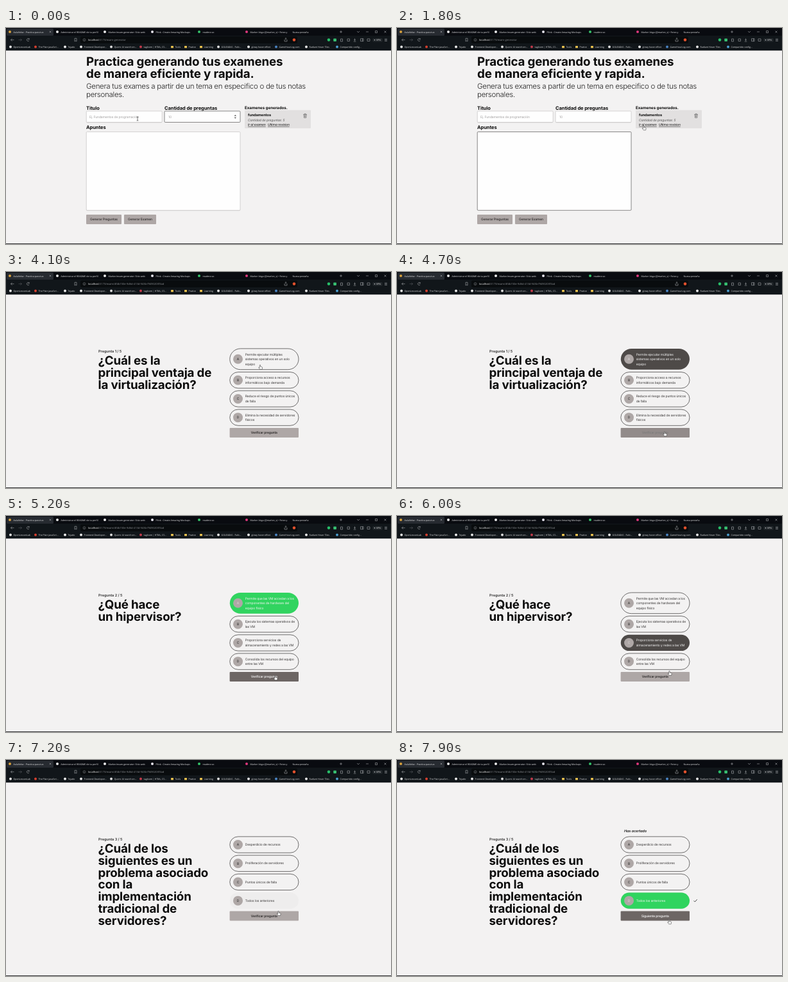
Write an HTML page that moves like this. It is 600x338 px and loops after 8 s.

```html
<!DOCTYPE html>
<html lang="es">
<head>
<meta charset="utf-8">
<title>Generador de examenes</title>
<style>
html, body { margin: 0; height: 100%; overflow: hidden; background: #f3f2f2; }
svg { display: block; width: 100vw; height: 100vh; font-family: Inter, Lato, sans-serif; text-rendering: geometricPrecision; font-optical-sizing: none; }
.ui { font-family: "Open Sans", "Noto Sans", sans-serif; }
</style>
</head>
<body>
<svg viewBox="0 0 600 338" preserveAspectRatio="none">
  <rect width="600" height="338" fill="#f3f2f2"/>
  <g id="page"></g>
  <g id="chrome" class="ui"></g>
  <g id="pointer"></g>
</svg>
<script>
const LOOP = 8000;
const INK = '#0b0b0b', TAUPE = '#aea7a6', UMBER = '#6d6664', DARK = '#4e4a48', GREEN = '#30d45f', PAPER = '#f3f2f2';
const EXAM_URL = '/exam/dfdb150e-9d6d-413d-943b-f9490203f3ad';
const $ = id => document.getElementById(id);

const clamp = v => Math.max(0, Math.min(1, v));
const ramp = (t, start, length = 120) => clamp((t - start) / length);
const pulse = (t, on, off) => ramp(t, on) * (1 - ramp(t, off));
const rgb = hex => [1, 3, 5].map(i => parseInt(hex.slice(i, i + 2), 16));
const mix = (a, b, k) => {
  const q = rgb(b);
  return `rgb(${rgb(a).map((v, i) => Math.round(v + (q[i] - v) * k))})`;
};

const text = (s, x, y, size = 5, weight = 400, fill = '#333', more = '') =>
  `<text x="${x}" y="${y}" font-size="${size}" font-weight="${weight}" fill="${fill}" letter-spacing="${weight > 500 ? -.008 : -.025}em" ${more}>${s}</text>`;
const label = (s, x, y, size = 3.6, fill = '#ededee') =>
  `<text x="${x}" y="${y}" font-size="${size}" fill="${fill}">${s}</text>`;
const rect = (x, y, w, h, fill, r = 0, more = '') =>
  `<rect x="${x}" y="${y}" width="${w}" height="${h}" rx="${r}" fill="${fill}" ${more}/>`;
const dot = (x, y, r, fill) => `<circle cx="${x}" cy="${y}" r="${r}" fill="${fill}"/>`;
const line = (d, stroke = '#c4c6c9', w = .5) =>
  `<path d="${d}" fill="none" stroke="${stroke}" stroke-width="${w}"/>`;
const lines = (list, x, y, step, ...style) => list.map((s, i) => text(s, x, y + i * step, ...style)).join('');
const middle = 'text-anchor="middle"', italic = 'font-style="italic"', link = italic + ' text-decoration="underline"';

const tabs = [
  [6, '#d8a13c', 'AulaVeloz - Practica para tus'],
  [80, '#eeeeee', 'Administrar el README de tu perfil'],
  [154, '#eeeeee', 'Marlon/exam-generator: Sitio web'],
  [228, '#e8e4f0', 'Plink - Create Amazing Mockups'],
  [301, '#35c46a', 'readme.so'],
  [375, '#e0387c', 'Marlon Vega (@marlon_v) • Fotos y'],
  [441, '', 'Nueva pestaña']
];
const bookmarks = [
  [7, '#e8e8e8', 'OpenLessonLab'], [46, '#d8402f', 'The Plain JavaScri...'], [92, '#eeeeee', 'Tejado'],
  [117, '#e8e8e8', 'Frontend Developer...'], [164, '#dddddd', 'Quern: AI search en...'],
  [210, '#c23a4b', 'tagloom | HTML, CS...'], [259, 'folder', 'Tools'], [280, 'folder', 'Pratice'],
  [304, 'folder', 'Learning'], [331, '#e6e6e6', 'GOLEADAS - Futb...'], [378, '#eeeeee', 'glowy hover effect'],
  [421, '#4b86c6', 'GameHourLog.com'], [468, '#eeeeee', 'Radiant Hover Tiles'], [516, '#4b9fd0', 'Compartido config...']
];

function chrome(exam) {
  let s = rect(0, 0, 600, 35.3, '#11161a') + rect(0, 0, 600, 12, '#090b10') + rect(1, 1, 73, 11, '#272b31', 1.5);
  for (const [x, color, name] of tabs)
    s += (color && dot(x, 6, 2, color)) + label(name, x + 5.5, 7.5);
  s += line('M67.7 4.7l2.6 2.6m0-2.6l-2.6 2.6M522 4v4m-2-2h4M547 5l2 2 2-2M561 6h4M575.5 4.5h3v3h-3zM589.5 4.5l3 3m0-3l-3 3');
  s += rect(116, 13.3, 338, 10.6, '#090c0e', 2);
  s += line('M12.5 18.6h-5m2-2l-2 2 2 2') + line('M19.5 18.6h5m-2-2l2 2-2 2', '#66696e')
    + line('M36 17.3a2 2 0 1 0 .2 2.2m0-3.4v1.6h-1.6M107 16.2h3v4.8l-1.5-1-1.5 1z')
    + line('M122 18v2.2m0-3.4v.5M124 18.6a2 2 0 1 1-4 0a2 2 0 1 1 4 0', '#a9abae', .4)
    + line('M434 18v3h4v-3m-2 1v-3.4m-1.2 1.2l1.2-1.2 1.2 1.2');
  s += dot(449, 18.6, 2.3, '#e4522d') + dot(503, 18.6, 2.3, '#28c06a') + rect(510.3, 16.4, 4.6, 4.6, '#38c172', .8);
  s += line('M521.5 17h3v4h-3zM532 17h3.5v3.5h-3.5zM543.5 16.3v3.2m-1.4-1.4l1.4 1.4 1.4-1.4m-3.2 3h3.6M552.5 16.7h4.5v4h-4.5zm3 0v4M563 17h4v3.5h-4zM590 17.2h4m-4 1.6h4m-4 1.6h4');
  s += rect(571.5, 16, 15, 5.8, '#22272b', 1) + dot(574.5, 18.8, .8, '#d0d2d4') + label('VPN', 577, 20.1);
  s += `<text x="128" y="20.2" font-size="4.05" fill="#8d9095"><tspan fill="#ffffff">localhost</tspan>:5173${exam ? EXAM_URL : '/exam-generator'}</text>`;
  for (const [x, color, name] of bookmarks)
    s += (color === 'folder' ? rect(x - 2, 28, 4, 3.2, '#e9c14f', .5) : dot(x, 29.5, 2, color)) + label(name, x + 4.6, 30.8, 3.5);
  return s + rect(0, 337, 600, 1, '#3a3a3c');
}

const field = (x, y, w, h, focused) =>
  (focused ? '' : rect(x, y + .6, w, h + .4, '#dcdada', 1.5))
  + rect(x, y, w, h, '#fefefe', 1.2, `stroke="${focused ? '#3c3a3a' : '#bdbbbb'}" stroke-width=".6"`);

function form(t) {
  const notes = t >= 750;
  let s = lines(['Practica generando tus examenes', 'de manera eficiente y rapida.'], 125, 59, 18.75, 18.75, 700, INK)
    + lines(['Genera tus exames a partir de un tema en especifico o de tus notas', 'personales.'], 125, 95, 12.5, 11.5, 300, '#222');
  s += text('Titulo', 125, 128, 7.5, 700, INK) + text('Cantidad de preguntas', 247, 128, 7.5, 700, INK)
    + text('Apuntes', 125, 157.8, 7.5, 700, INK);
  s += field(125.2, 130, 118, 17.5, false) + field(247, 130, 118, 17.5, !notes) + field(125.2, 162.5, 239.8, 122.8, notes);
  s += text('Ej. Fundamentos de programación', 130, 140.7, 5, 400, '#a3a1a1') + text('10', 253, 140.7, 5, 400, '#a3a1a1');
  if (!notes) s += '<path d="M355.6 137.8l1.7-2 1.7 2zM355.6 139.8l1.7 2 1.7-2z" fill="#555"/>';
  [[125, 55, 'Generar Preguntas'], [184, 50, 'Generar Examen']].forEach(([x, w, name]) =>
    s += rect(x, 292, w, 15, TAUPE, 1) + text(name, x + w / 2, 301.3, 5, 500, '#2b2828', middle));
  s += text('Examenes generados.', 372, 126.7, 6.25, 700, INK) + rect(372, 128.5, 103, 28.5, '#e2e0e0', 1)
    + text('fundamentos', 377, 137.7, 5.625, 700, INK)
    + text('Cantidad de preguntas: 5', 377, 145.7, 5, 400, '#555', italic)
    + text('Ir al examen', 377, 153.2, 5, 500, '#222', link)
    + text('Ultima revision', 408, 153.2, 5, 500, '#222', link)
    + line('M463.3 135.3h5.6m-4.8 0l.4 5.2h3.2l.4-5.2m-3 0v-1h2v1m-1.6 1.3v2.6m1.2-2.6v2.6', '#444', .55);
  // link address in the status bubble
  if (t >= 2000 && t < 3500)
    s += `<g class="ui">${rect(0, 331, 126, 7, '#202329', 1) + label('localhost:5173' + EXAM_URL, 2, 335.8)}</g>`;
  return s;
}

const quiz = [
  { start: 3800, pick: 4300, hover: 4650, check: 4800, end: 5150, choice: 0,
    ask: ['¿Cuál es la', 'principal ventaja de', 'la virtualización?'],
    options: [['Permite ejecutar múltiples', 'sistemas operativos en un solo', 'equipo'],
      ['Proporciona acceso a recursos', 'informáticos bajo demanda'],
      ['Reduce el riesgo de puntos únicos', 'de falla'],
      ['Elimina la necesidad de servidores', 'físicos']] },
  { start: 5150, pick: 5600, hover: 6050, check: 6200, end: 6650, choice: 2,
    ask: ['¿Qué hace', 'un hipervisor?'],
    options: [['Permite que las VM accedan a los', 'componentes de hardware del', 'equipo físico'],
      ['Ejecuta los sistemas operativos de', 'las VM'],
      ['Proporciona servicios de', 'almacenamiento y redes a las VM'],
      ['Consolida los recursos del equipo', 'entre las VM']] },
  { start: 6650, pick: 7196, hover: 7260, check: 7500, end: 9000, choice: 3,
    ask: ['¿Cuál de los', 'siguientes es un', 'problema asociado', 'con la', 'implementación', 'tradicional de', 'servidores?'],
    options: [['Desperdicio de recursos'], ['Proliferación de servidores'], ['Puntos únicos de falla'], ['Todos los anteriores']] }
];

function exam(t) {
  const n = quiz.findIndex(q => t < q.end), q = quiz[n], before = quiz[n - 1];
  const done = t >= q.check;
  let s = text(`Pregunta ${n + 1} / 5`, 144, 126.2, 5.625, 600, '#333')
    + lines(q.ask, 143.5, 145, 18.75, 18.75, 700, INK);
  if (done) s += text('Has acertado', 354, 113.4, 5.625, 500, '#000', italic);
  let y = 119.6;
  q.options.forEach((rows, i) => {
    const h = rows.length > 2 ? 33.4 : 25.9, cy = y + h / 2;
    let fill = PAPER, strength = 0;
    if (i === q.choice && t >= q.pick) {
      strength = ramp(t, q.pick, 160);
      fill = done ? mix(DARK, GREEN, ramp(t, q.check, 90)) : mix(PAPER, DARK, strength);
    } else if (before && i === before.choice) {
      strength = 1 - ramp(t, q.start + 50, 150);
      fill = mix(PAPER, GREEN, strength);
    }
    const ink = mix('#383636', '#f4f4f4', strength);
    s += rect(348.8, y + .3, 107.2, h - .6, fill, h / 2, strength ? '' : 'stroke="#242222" stroke-width=".65"');
    s += dot(361.5, cy, 7.5, TAUPE) + text('ABCD'[i], 361.5, cy + 1.8, 5, 400, mix('#222222', '#dedada', strength), middle);
    s += lines(rows, 372.7, cy + 1.7 - (rows.length - 1) * 3.75, 7.5, 5, 400, ink);
    if (done && i === q.choice) s += line(`M462.5 ${cy}l1.8 1.8 3.4-3.8`, '#222', .8);
    y += h + 3.3;
  });
  const dark = Math.max(pulse(t, q.hover, q.end + 100), before ? 1 - ramp(t, q.start + 110) : 0);
  return s + rect(348.6, y, 107.4, 15, mix(TAUPE, UMBER, dark), 1)
    + text(done ? 'Siguiente pregunta' : 'Verificar pregunta', 402.3, y + 9.2, 5, 500, mix('#1a1818', '#ffffff', dark), middle);
}

const shapes = {
  beam: line('M-1.3-3h1l.3.4.3-.4h1M0-2.8v5.6M-1.3 3h1l.3-.4.3.4h1', '#222', .6),
  hand: '<path d="M-.7 .6a.7.7 0 0 1 1.4 0v2l2.3.6q.8.3.6 1.2l-.5 2.4h-3.4l-1.9-2.5q-.3-.8.6-.7l.9.6z" fill="#fff" stroke="#222" stroke-width=".5"/>'
};
const route = [
  [0, 205, 142, 'beam'], [500, 222, 205, 'beam'], [900, 228, 210, 'beam'], [1250, 300, 185, 'beam'],
  [1700, 384.5, 153, 'hand'], [2700, 385.5, 152.5, 'hand'], [3750, 386, 152, 'hand'], [4080, 396, 145.5, 'hand'],
  [4320, 396, 145.5, 'hand'], [4700, 417, 250, 'hand'], [5200, 419.5, 250, 'hand'], [5520, 405, 200, 'hand'],
  [5650, 405, 200, 'hand'], [6000, 424.5, 242.5, 'hand'], [6120, 425, 248, 'hand'], [6700, 425, 248, 'hand'],
  [6950, 412, 221, 'hand'], [7080, 412, 221, 'hand'], [7200, 424.5, 236.5, 'hand'], [7350, 424, 249, 'hand'],
  [8000, 424, 250, 'hand']
];

function pointer(t) {
  const i = route.findIndex(k => k[0] > t), a = route[i - 1], b = route[i];
  const u = (t - a[0]) / (b[0] - a[0]), e = u * u * (3 - 2 * u);
  const at = j => (a[j] + (b[j] - a[j]) * e).toFixed(2);
  return `<g transform="translate(${at(1)} ${at(2)})">${shapes[u < .7 ? a[3] : b[3]]}</g>`;
}

const shown = {};
function show(id, markup) {
  if (shown[id] !== markup) $(id).innerHTML = shown[id] = markup;
}

function draw() {
  const t = performance.now() % LOOP, inExam = t >= quiz[0].start;
  show('page', inExam ? exam(t) : form(t));
  show('chrome', chrome(inExam));
  show('pointer', pointer(t));
  requestAnimationFrame(draw);
}
draw();
</script>
</body>
</html>
```
